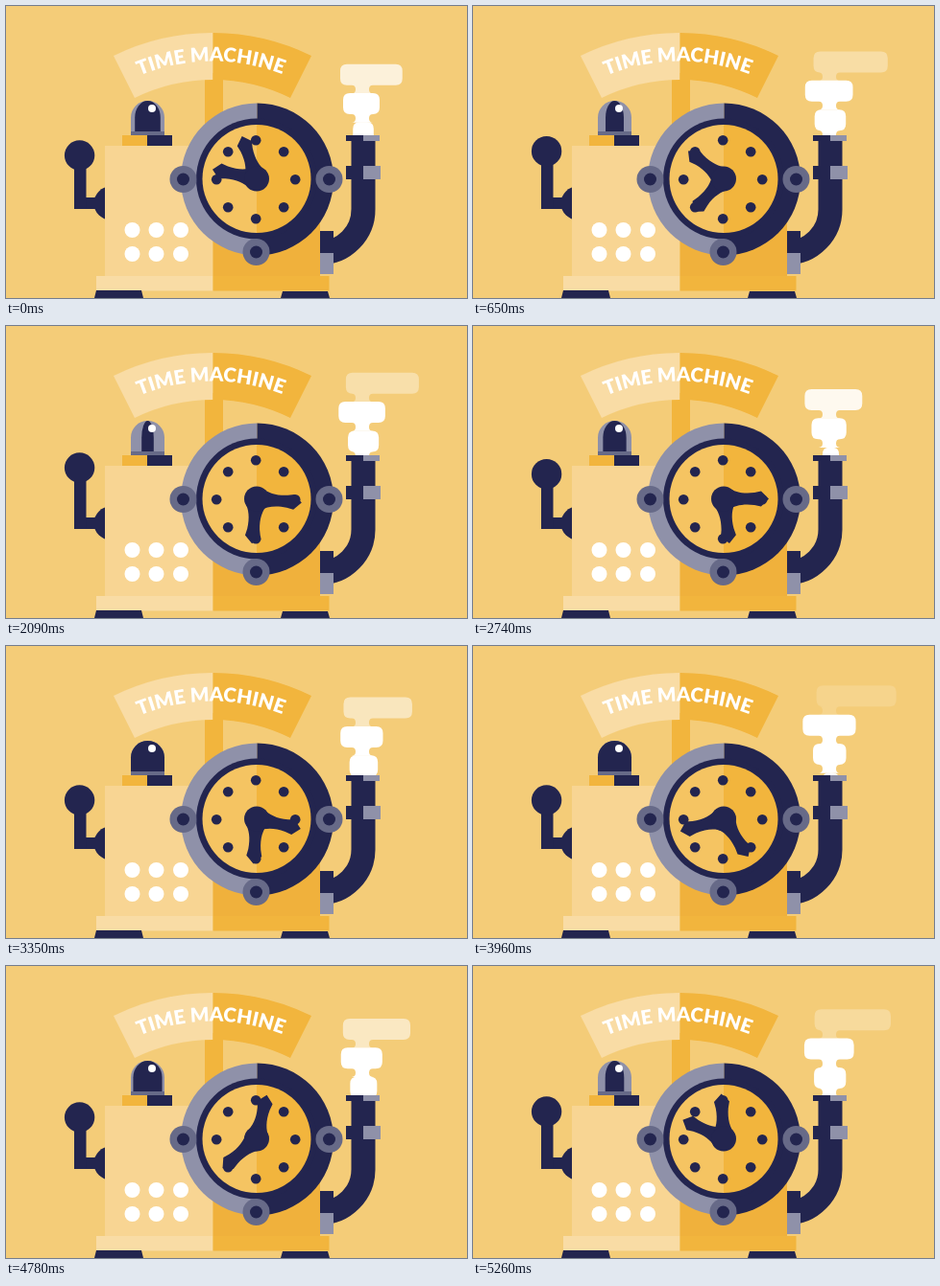
Animation of 480x305 px, one loop 5.3 s. Source, as an HTML page:

```html
<!DOCTYPE html>
<html lang="en">
<head>
<meta charset="utf-8">
<title>Time machine</title>
<style>
  html, body { margin: 0; width: 100%; height: 100%; overflow: hidden; background: #f4cc78; }
  svg { display: block; width: 100vw; height: 100vh; }
  .pale { fill: #f9dca5; }
  .cream { fill: #f8d593; }
  .amber { fill: #f5c462; }
  .gold { fill: #f2b53d; }
  .ochre { fill: #f0b13c; }
  .navy { fill: #23254f; }
  .grey { fill: #8f91a9; }
  .slate { fill: #676a88; }
  .white { fill: #fff; }
  text { font: 900 20.5px Lato, "Open Sans", sans-serif; text-anchor: middle; }
</style>
</head>
<body>
<svg viewBox="0 0 480 305">
  <defs>
    <path id="arc" d="M34 170A202 202 0 0 1 396 170"/>
    <path id="dome" d="M-17.500 34V17.500A17.500 17.500 0 0 1 17.500 17.500V34Z"/>
    <path id="hand" d="M-12 -4C-7 -12 -5 -20 -6.500 -32L-8 -39L0 -47L8 -39L6.500 -32C5 -20 7 -12 12 -4Z"/>
    <g id="bolt"><circle r="14" class="slate"/><circle r="6.5" class="navy"/></g>
  </defs>

  <g id="smoke" fill="#fff"></g>

  <!-- exhaust pipe -->
  <path d="M372 138V212A45.500 45.500 0 0 1 327 258" fill="none" stroke="#23254f" stroke-width="25"/>
  <path class="navy" d="M354 135h18v6h-18zM354 167h18v14h-18zM327 235h14v23h-14z"/>
  <path class="grey" d="M372 135h17v6h-17zM372 167h18v14h-18zM327 258h14v22h-14z"/>

  <!-- lever -->
  <circle class="navy" cx="109" cy="206" r="17.5"/>
  <path class="navy" d="M71 200H96V212H71Z"/>
  <path id="stem" class="navy"/>
  <circle id="ball" class="navy" cx="76.6" r="15.7"/>

  <!-- sign -->
  <path class="gold" d="M207 70h19v80h-19z"/>
  <path class="pale" d="M112 52A233 233 0 0 1 215.500 28V77A184 184 0 0 0 134 96Z"/>
  <path class="gold" d="M318 52A233 233 0 0 0 215.500 28V77A184 184 0 0 1 296 96Z"/>
  <text class="white"><textPath href="#arc" startOffset="49.6%">TIME MACHINE</textPath></text>

  <!-- lamp -->
  <path class="gold" d="M121 135h26v13h-26z"/>
  <path class="navy" d="M147 135h26v13h-26z"/>
  <use href="#dome" x="147.5" y="99" class="grey"/>
  <use href="#dome" id="shade" class="navy"/>
  <path class="slate" d="M130 131h35v4h-35z"/>
  <circle class="white" cx="152" cy="107" r="4"/>

  <!-- body -->
  <path class="cream" d="M103 146H215.500V282H103Z"/>
  <path class="ochre" d="M215.500 146H327V282H215.500Z"/>
  <path class="pale" d="M94 282H215.500V297.500H94Z"/>
  <path class="gold" d="M215.500 282H336.500V297.500H215.500Z"/>
  <path class="navy" d="M94 297h47l2 8H92zM288 298h47l2 7H286z"/>
  <g id="lights" class="white"></g>

  <!-- clock -->
  <path class="grey" d="M261.500 101.500A79.500 79.500 0 0 0 261.500 260.500Z"/>
  <path class="navy" d="M261.500 101.500A79.500 79.500 0 0 1 261.500 260.500Z"/>
  <circle class="navy" cx="261" cy="180.500" r="63"/>
  <path class="amber" d="M261 124A56.500 56.500 0 0 0 261 237Z"/>
  <path class="gold" d="M261 124A56.500 56.500 0 0 1 261 237Z"/>
  <g id="hours" class="navy"></g>
  <use href="#bolt" x="184.5" y="181"/>
  <use href="#bolt" x="336.5" y="181"/>
  <use href="#bolt" x="260.5" y="257"/>
  <use href="#hand" id="handA" class="navy"/>
  <use href="#hand" id="handB" class="navy"/>
  <circle class="navy" cx="261" cy="180.500" r="13"/>
</svg>
<script>
const LOOP = 5300, FRAME = 1000 / 23, PUFF_GAP = 34.5;
const KEYS = [0, 30, 48, 77, 91, 110, 121];
const ANGLE_A = [282, 164, 95, 103, 147, 229, 295];
const ANGLE_B = [341, 269, 186, 184, 254, 373, 357];
const LEVER_Y = [156, 148, 148, 161, 161, 158, 152];

const byId = id => document.getElementById(id);
const set = (node, attrs) => {
  for (const name in attrs) node.setAttribute(name, attrs[name]);
};
const add = (parent, tag, attrs) => {
  const node = document.createElementNS('http://www.w3.org/2000/svg', tag);
  set(node, attrs);
  parent.appendChild(node);
  return node;
};
const clamp = (x, lo, hi) => Math.min(hi, Math.max(lo, x));

function linear(xs, ys, x) {
  x = clamp(x, xs[0], xs[xs.length - 1]);
  const i = Math.max(1, xs.findIndex(v => v >= x));
  return ys[i - 1] + (ys[i] - ys[i - 1]) * (x - xs[i - 1]) / (xs[i] - xs[i - 1]);
}

// Cubic Hermite curve through unevenly spaced keys
function smooth(ys, x) {
  const last = KEYS.length - 1;
  x = clamp(x, 0, KEYS[last]);
  const i = Math.max(1, KEYS.findIndex(v => v >= x));
  const slope = k => {
    const a = Math.max(0, k - 1), b = Math.min(last, k + 1);
    return (ys[b] - ys[a]) / (KEYS[b] - KEYS[a]);
  };
  const h = KEYS[i] - KEYS[i - 1], u = (x - KEYS[i - 1]) / h, v = 1 - u;
  return v * v * (1 + 2 * u) * ys[i - 1] + u * u * (3 - 2 * u) * ys[i]
    + h * u * v * (v * slope(i - 1) - u * slope(i));
}

for (const y of [234, 259])
  for (const x of [131.5, 156.5, 182]) add(byId('lights'), 'circle', { cx: x, cy: y, r: 8 });
for (let i = 0; i < 8; i++) {
  const a = i * Math.PI / 4;
  add(byId('hours'), 'circle', { cx: 260.2 + 41 * Math.sin(a), cy: 181.2 - 41 * Math.cos(a), r: 5.3 });
}
const puffs = [0, 1, 2, 3].map(() => add(byId('smoke'), 'path', {}));

// Rounded cloud with a flared neck reaching down to the next one
function puffPath(age) {
  const left = linear([-40, -34, -25, -4, 0, 23, 57.5, 62], [364, 361, 357, 352, 351, 343, 358, 360], age);
  const right = linear([-40, -34, -25, 0, 23, 30, 57.5, 62], [381, 383, 388, 389, 399, 407, 442, 447], age);
  const mid = 102 - 0.88 * age, top = mid - 11, bottom = mid + 11;
  const r = Math.min(7, (right - left) / 2), n1 = 364, n2 = 378;
  return `M${left + r} ${top}H${right - r}q${r} 0 ${r} ${r}V${bottom - r}q0 ${r} ${-r} ${r}` +
    `H${n2 + 4}q-4 0 -4 4.3q0 4.4 4 4.4H${n1 - 4}q4 0 4 -4.4q0 -4.3 -4 -4.3` +
    `H${left + r}q${-r} 0 ${-r} ${-r}V${top + r}q0 ${-r} ${r} ${-r}Z`;
}

function render(ms) {
  const step = Math.floor((ms % LOOP + 5) / FRAME);

  const leverY = smooth(LEVER_Y, step);
  set(byId('ball'), { cy: leverY });
  set(byId('stem'), { d: `M71 ${leverY}H83.5V212H71Z` });

  const width = clamp(0.36 + (leverY - 148) * 0.05, 0.34, 1);
  set(byId('shade'), { transform: `translate(147.500 99) scale(${width} 1)` });

  set(byId('handA'), { transform: `translate(261 180.500) rotate(${smooth(ANGLE_A, step)})` });
  set(byId('handB'), { transform: `translate(261 180.500) rotate(${smooth(ANGLE_B, step)})` });

  // The youngest puff is still inside the pipe
  const newest = step % PUFF_GAP - 2 * PUFF_GAP;
  puffs.forEach((puff, i) => {
    const age = newest + i * PUFF_GAP;
    set(puff, { d: puffPath(age), opacity: clamp((62 - age) / 38, 0, 1) });
  });
}

function tick() {
  render(performance.now());
  requestAnimationFrame(tick);
}
tick();
</script>
</body>
</html>
```
